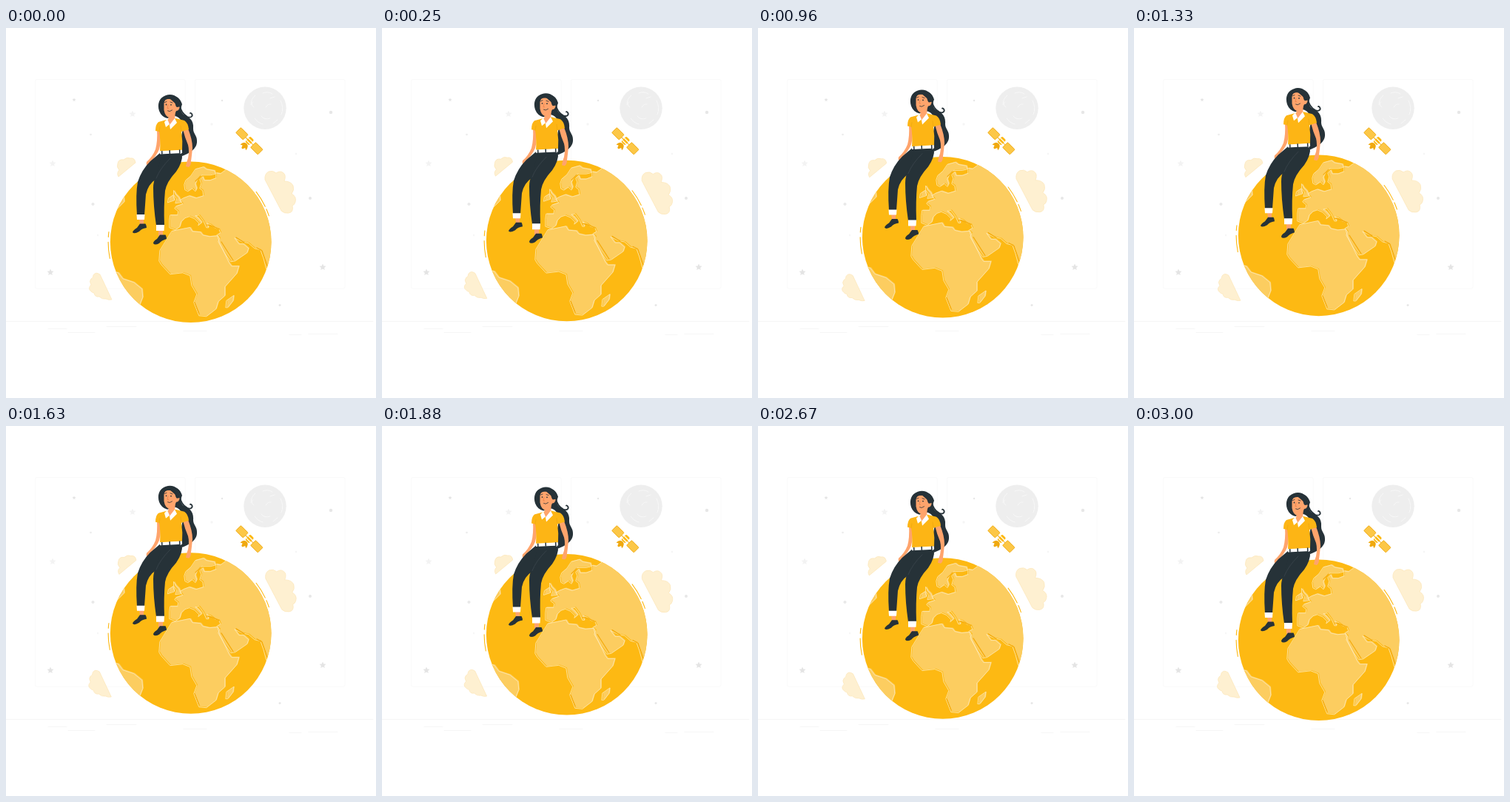
An HTML page that plays this animation: 500x500 px, repeating every 3040 ms.

```html
<!DOCTYPE html>
<html lang="en">
<head>
<meta charset="utf-8">
<style>
  html, body { margin: 0; width: 100%; height: 100%; overflow: hidden; background: #fff; }
  svg { display: block; width: 100vw; height: 100vh; }
  .line { fill: none; stroke-linecap: round; stroke-linejoin: round; }
  .dark { fill: #263238; }
  .skin { fill: #ffa46c; }
  .cloud { fill: #fef0d1; stroke: #fde8bb; stroke-width: .8; }
</style>
</head>
<body>
<svg viewBox="0 0 500 500">
  <defs>
    <clipPath id="disc"><circle cx="249.7" cy="289.2" r="108.8"/></clipPath>
    <g id="coast">
      <!-- Europe, Asia and Arabia -->
      <path d="M299 185L298 191L291 196L285 195L285 202L277 205L269 205L267 200L263 204L265 209L263 216L267 219L268 226L258 229L249 226L241 229L236 232L240 237L231 240L229 243L234 247L233 252L223 252L222 259L222 269L230 272L236 268L238 261L243 256L249 254L256 257L262 263L261 266L266 262L261 256L257 253L262 252L268 260L272 269L275 269L273 263L278 265L283 269L289 271L291 276L286 279L290 283L288 288L297 304L305 315L311 314L327 303L329 297L322 291L316 291L310 283L320 288L329 290L337 297L345 299L349 310L353 325L375 325L375 185Z"/>
      <!-- Scandinavia -->
      <path d="M284 196L283 192L272 190L268 187L257 190L251 199L244 205L242 211L243 218L247 220L253 216L257 220L259 216L257 210L260 203L266 198L277 198Z"/>
      <!-- Africa -->
      <path d="M250 269L253 274L264 275L267 279L276 281L287 280L290 290L303 317L306 321L316 321L313 331L297 349L297 361L288 369L285 379L272 389L262 388L255 370L259 359L252 347L250 334L240 330L223 332L211 319L208 314L209 300L217 287L225 274Z"/>
      <!-- Madagascar and the British Isles -->
      <path d="M309 361L308 368L301 377L298 377L299 368ZM228 219L231 224L235 228L238 235L230 236L232 230L228 225ZM221 229L227 225L229 232L220 235Z"/>
      <!-- Americas -->
      <path d="M140 327L153 330L159 338L174 343L185 352L186 363L180 378L150 380ZM140 225L160 225L161 234L154 241L148 247L140 247Z"/>
    </g>
    <path id="star" d="M0-4.6L1.3-1.6L4.5-1.3L2.1.9L2.8 4L0 2.4L-2.8 4L-2.1.9L-4.5-1.3L-1.3-1.6Z"/>
  </defs>

  <g class="line" stroke="#fafafa">
    <rect x="39.5" y="69.5" width="202.5" height="282.5" rx="2"/>
    <rect x="255.5" y="69.5" width="202.5" height="282.5" rx="2"/>
    <path stroke="#f6f6f6" d="M0 396.5H496M57 406.5H82M84 411.5H120M136 403.5H176M240 409.5H271M383 414.5H399M409 413.5H448"/>
  </g>
  <g id="sky"></g>

  <circle cx="350" cy="108.3" r="28.7" fill="#eee"/>
  <path class="line" stroke="#f8f8f8" d="M331 104Q331 95 337 91M335 107Q331 105 333 100M347 88Q353 85 360 89M357 95L363 93M351 107Q354 102 358 103M371 98Q376 108 372 117M345 119Q349 125 357 122M336 122Q340 128 347 130M361 129L367 124"/>

  <g transform="translate(328.8 152.8) rotate(45)">
    <g fill="#fcc747" stroke="#f0a90f" stroke-width=".9">
      <rect x="-21" y="-4.8" width="13.8" height="9.6" rx="1"/>
      <rect x="7.2" y="-4.8" width="13.8" height="9.6" rx="1"/>
    </g>
    <path d="M-7 0H7" stroke="#f0a90f"/>
    <rect x="-3.8" y="-5.5" width="7.6" height="10" rx="2" fill="#fdb913"/>
    <path d="M-4 -2H4M-4 2H4" stroke="#fff" stroke-width="1.2"/>
    <path d="M-5.500 12Q-5 5 0 5T5.500 12L2.500 10.500L1 14H-1L-2.500 10.500Z" fill="#f0a90f"/>
  </g>

  <path class="cloud" data-dir="1.4 1.7" d="M350 205Q349 197 355 194Q361 192 365 196Q371 192 375 196Q379 199 376 207Q385 207 388 213Q390 219 386 224Q393 228 391 235Q390 239 387 240Q389 249 382 250Q376 251 372 247Z"/>
  <path class="cloud" data-dir="-1.4 -1.9" d="M127 333Q121 329 118 334Q118 338 115 339Q112 342 115 347Q110 352 115 356Q117 358 119 358Q120 364 126 363Q130 367 135 366Q139 368 143 367Z"/>
  <path class="cloud" data-dir="1.7 -1" d="M152 201Q149 196 153 192Q149 188 151 183Q152 177 159 178Q163 174 168 176Q174 175 175 182Z"/>

  <g id="float">
    <circle cx="249.7" cy="289.2" r="108.8" fill="#fdb913"/>
    <g clip-path="url(#disc)">
      <use href="#coast" fill="#fccd60"/>
      <use href="#coast" class="line" stroke="#feeab6" stroke-width=".8" x="-1.2" y=".8"/>
      <path class="line" stroke="#f4aa0b" stroke-width="1.2" d="M291 289L307 314M311 283L322 290M339 297L346 301L353 321M256 207L263 200M271 266L277 267L288 272M255 371L261 386"/>
    </g>
    <path id="speed" class="line" stroke="#fdb913" stroke-width="1.1"/>

    <!-- hair behind the body -->
    <path class="dark" d="M216 91C207 94 204 103 207 112Q210 120 218 122L229 119Q239 122 239 137Q235 152 236 162Q236 169 238 173C246 170 259 164 258 152C258 145 253 143 253 136C254 124 247 120 240 117Q234 112 238 103C236 95 226 87 216 91Z"/>
    <path class="line" stroke="#263238" stroke-width="1.800" d="M235 105C236 112 240 117 245 120C250 122 253 119 251 116Q250 114.500 249 115"/>

    <!-- arms -->
    <path class="skin" d="M204 137L208 138Q210 153 207 164Q203 173 196 180L191 186Q189 185 190 181Q198 174 202 164Q205 153 204 137Z"/>
    <path class="skin" d="M239 137L246 136Q252 151 252 162Q251 173 250 180Q250 186 247 188L243 187Q244 181 246 176Q248 166 246 158Q242 149 239 137Z"/>

    <!-- far leg, near leg -->
    <path class="skin" d="M180 257H186L186 266H181ZM206 272H212L212 281H206Z"/>
    <path class="dark" d="M208 169H236L221 191L203 204Q192 211 189 225L187 253H177Q175 224 178 208Q183 192 195 180Z"/>
    <path class="dark" d="M211 170H238Q239 181 230 194Q217 208 215 220Q213 240 214 267H203Q199 240 199 216Q199 207 203 199Z"/>
    <path class="line" stroke="#465158" stroke-width=".5" d="M222 176Q208 190 203 203"/>
    <path fill="#fff" d="M176.500 252H187.500L187 259H177ZM203 266H214L213.500 274H203Z"/>
    <path class="dark" d="M171 276Q172 273 177 270L181 264.500H188.500Q190 267 190 270Q183 271 180 275Q173 279 171 276ZM199 291Q199 288 204 285L208 279.500H215.500Q217 282 217 285Q210 287 207 291Q201 294 199 291Z"/>

    <!-- shirt and belt -->
    <path fill="#fdb515" d="M217 124L206 127Q202 130 202 139L207 140Q209 151 208 167L238 165Q239 153 237 140L247 137Q246 128 241 125L229 122Z"/>
    <path class="line" stroke="#e9a40e" stroke-width=".6" d="M207 140L208 134M237 140L236 132"/>
    <g transform="rotate(-3 223 167.500)">
      <rect x="208" y="165.500" width="30" height="4.200" fill="#fff"/>
      <path class="dark" d="M210 165.500H211.500V170H210ZM220.500 165H222V170H220.500ZM234 165H235.500V170H234Z"/>
    </g>

    <!-- neck, collar, head -->
    <path class="skin" d="M220 116L229 111L228 125L221 132L219 126Z"/>
    <path fill="#fff" d="M218 123L214 127L216 134L221 130ZM228 122L231 128L222 137L221 131Z"/>
    <path class="skin" d="M213.500 102Q214 95 222 96L231 104Q236 105 234 109Q233 112 230 112Q227 121 221 121Q215 120 213.500 111Z"/>
    <path class="dark" d="M211 105Q212 98 216 96Q223 95 228 99Q229 106 231 107L237 106Q238 97 230 93Q216 88 210 99Z"/>
    <path class="line" stroke="#263238" stroke-width=".8" d="M214.500 100.500L217 99.500M222 100L225 101M218.500 112Q221 114 224.500 111"/>
    <path class="line" stroke="#e4743d" stroke-width=".6" d="M219 104L218 108.500H219.500"/>
    <g class="dark"><circle cx="216.500" cy="103.500" r=".9"/><circle cx="223" cy="103.800" r=".9"/></g>
  </g>
</svg>
<script>
const LOOP = 3040, CYCLE = 3000; // the pose rests for the last moment of the loop
const $ = id => document.getElementById(id);
const clouds = [...document.querySelectorAll('.cloud')].map(el => ({
  el, dir: el.dataset.dir.split(' ').map(Number)
}));

// x, y, scale, colour
const stars = [
  [92, 97, .55, '#e4e4e4'], [171, 116, 1, '#f3f3f3'], [63, 183, 1, '#f3f3f3'],
  [60, 330, 1, '#e4e4e4'], [428, 323, 1, '#e4e4e4']
];
// x, y, radius, colour
const dots = [
  [439, 114, 2.2, '#e7e7e7'], [411, 230, 2, '#e7e7e7'], [117.5, 238, 2.1, '#e9e9e9'],
  [114.5, 144, 1.3, '#ebebeb'], [292, 98, 1.2, '#e7e7e7'], [278, 130, 1.7, '#f5f5f5'],
  [392, 170, 1.3, '#f5f5f5'], [370, 374.5, 1.5, '#e7e7e7'], [124, 280, 1.2, '#f6f6f6']
];
$('sky').innerHTML =
  stars.map(([x, y, s, c]) => `<use href="#star" transform="translate(${x} ${y}) scale(${s})" fill="${c}"/>`).join('') +
  dots.map(([x, y, r, c]) => `<circle cx="${x}" cy="${y}" r="${r}" fill="${c}"/>`).join('');

function arc(r, from, to) {
  const at = deg => {
    const a = deg * Math.PI / 180;
    return `${249.7 + r * Math.cos(a)} ${289.2 + r * Math.sin(a)}`;
  };
  return `M${at(from)}A${r} ${r} 0 0 1 ${at(to)}`;
}
$('speed').setAttribute('d',
  arc(111.6, 168.5, 180) + arc(111.6, 183.5, 187) + arc(111.4, -37.5, -25.5) + arc(111.4, -23.5, -18.5));

function frame(now) {
  const p = Math.min(now % LOOP / CYCLE, 1);
  const rise = 10 * (1 - Math.abs(1 - 2 * p));
  const sway = Math.sin(4 * Math.PI * p);
  $('float').setAttribute('transform', `translate(0 ${-rise})`);
  for (const { el, dir: [dx, dy] } of clouds)
    el.setAttribute('transform', `translate(${dx * sway} ${dy * sway})`);
}

const start = performance.now();
(function tick() {
  frame(performance.now() - start);
  requestAnimationFrame(tick);
})();
</script>
</body>
</html>
```
